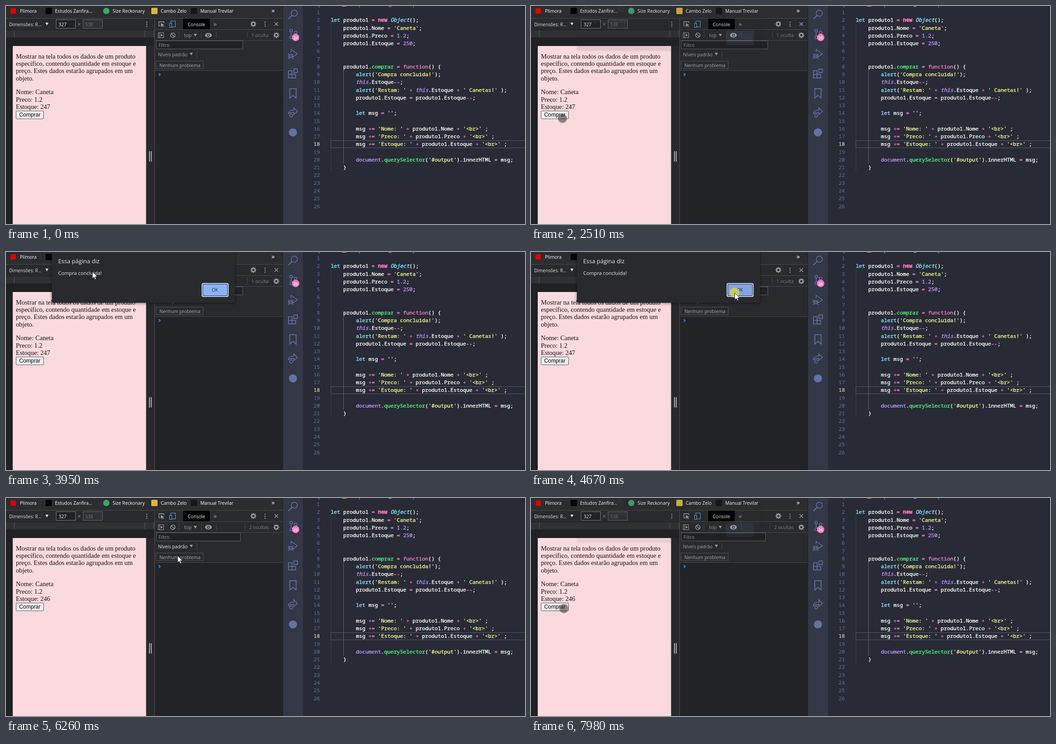
Write an HTML page with a canvas that moves like this. It is 1154 by 485 pixels and loops after 8 s.

```html
<!DOCTYPE html>
<html lang="pt">
<head>
<meta charset="utf-8">
<title>Produto</title>
<style>
html, body { margin: 0; width: 100%; height: 100%; overflow: hidden; background: #222326; }
canvas { display: block; }
</style>
</head>
<body>
<canvas id="stage" width="1154" height="485"></canvas>
<script>
const W = 1154, H = 485, LOOP = 8000;
const screen2d = document.getElementById('stage').getContext('2d');
const layer = document.createElement('canvas');
layer.width = W;
layer.height = H;
const layer2d = layer.getContext('2d');
let g = screen2d;

const UI = '"Open Sans", "Noto Sans", sans-serif';
const SERIF = '"Liberation Serif", serif';
const ARIAL = '"Liberation Sans", sans-serif';
const MONO = '"Noto Sans Mono", "DejaVu Sans Mono", monospace';

function rect(x, y, w, h, color) {
  g.fillStyle = color;
  g.fillRect(x, y, w, h);
}

function frame(x, y, w, h, color, width = 1) {
  g.strokeStyle = color;
  g.lineWidth = width;
  g.strokeRect(x + .5, y + .5, w - 1, h - 1);
}

function round(x, y, w, h, r, color) {
  g.beginPath();
  g.roundRect(x, y, w, h, r);
  g.fillStyle = color;
  g.fill();
}

function disc(x, y, r, color, squash = 1) {
  g.beginPath();
  g.ellipse(x, y, r, r * squash, 0, 0, 7);
  g.fillStyle = color;
  g.fill();
}

function ring(x, y, r, color, width = 1.6) {
  g.beginPath();
  g.arc(x, y, r, 0, 7);
  g.strokeStyle = color;
  g.lineWidth = width;
  g.stroke();
}

// An SVG path drawn with its own origin at x, y
function icon(x, y, d, color, width) {
  const path = new Path2D(d);
  g.save();
  g.translate(x, y);
  if (width) {
    g.strokeStyle = color;
    g.lineWidth = width;
    g.stroke(path);
  } else {
    g.fillStyle = color;
    g.fill(path);
  }
  g.restore();
}

function text(s, x, y, color, size = 10.3, family = UI, align = 'left', style = '') {
  g.font = `${style} ${size}px ${family}`;
  g.textAlign = align;
  g.fillStyle = color;
  g.fillText(s, x, y);
}

function down(x, y, color) {
  icon(x, y, 'M-3.5-3h7L0 3z', color);
}

function kebab(x, y, color) {
  for (const d of [-4.5, 0, 4.5]) disc(x, y + d, 1.2, color);
}

function gear(x, y, color) {
  ring(x, y, 3.7, color, 2.4);
  g.save();
  g.translate(x, y);
  for (let i = 0; i < 8; i++) {
    rect(-1.1, 4, 2.2, 2.3, color);
    g.rotate(Math.PI / 4);
  }
  g.restore();
}

function bookmarks() {
  rect(0, 0, 616, 27, '#2c2d30');
  round(10, 5, 12, 12, 2, '#e00000');
  rect(88, 4, 14, 14, '#050505');
  disc(223, 11, 7, '#3fa66b');
  round(323, 4, 14, 14, 2, '#d9b63c');
  rect(411, 4, 14, 14, '#151515');
  const names = { 31: 'Plimora', 109: 'Estudos Zanfira...', 237: 'Size Reckonary',
    344: 'Cambo Zelo', 432: 'Manual Trevilar' };
  for (const x in names) text(names[x], x, 14.5, '#fff');
  text('»', 594, 15, '#fff', 15, UI, 'center');
  rect(0, 27, 616, 1, '#4a4c50');
}

function deviceBar() {
  rect(0, 28, 330, 25, '#292a2d');
  text('Dimensões: R...', 7, 44.5, '#dfe1e4', 10.1);
  down(91, 40, '#dfe1e4');
  rect(111, 30, 44, 20, '#202124');
  frame(111, 30, 44, 20, '#7d7f82');
  text('327', 117, 44.5, '#fff');
  text('×', 163, 45, '#8c8f93', 12, UI, 'center');
  rect(171, 30, 44, 20, '#303134');
  frame(171, 30, 44, 20, '#66686b');
  text('538', 176, 44.5, '#75777a');
  kebab(313, 40.5, '#9aa0a6');
  rect(0, 53, 330, 17, '#303134');
  rect(0, 53, 330, 1, '#1f2022');
  for (const x of [18, 308, 328]) rect(x, 54, 1, 15, '#55575a');
}

function page(stock) {
  const ink = '#121212';
  rect(0, 70, 330, 415, '#202124');
  rect(312, 89, 18, 396, '#28292c');
  for (const x of [318, 322]) rect(x, 323, 2, 23, '#aeb0b3');
  rect(15, 89, 296.5, 396, '#fadadf');
  const intro = ['Mostrar na tela todos os dados de um produto',
    'específico, contendo quantidade em estoque e',
    'preço. Estes dados estarão agrupados em um', 'objeto.'];
  const data = ['Nome: Caneta', 'Preco: 1.2', 'Estoque: ' + stock];
  intro.forEach((s, i) => text(s, 22, 116.5 + i * 16.4, ink, 14.55, SERIF));
  data.forEach((s, i) => text(s, 22, 196.3 + i * 16.4, ink, 14.55, SERIF));
  round(22, 233, 62, 18.5, 2.5, '#565656');
  round(23, 234, 60, 16.5, 1.5, '#eeeeee');
  text('Comprar', 53, 246.3, '#0a0a0a', 12.2, ARIAL, 'center');
}

function devtools(hidden, hover) {
  const ic = '#9aa0a6', blue = '#62a9f0', rule = '#47494c';
  const shift = hidden > 1 ? 5 : 0;
  rect(331, 28, 285, 457, '#222326');
  rect(331, 28, 285, 115, '#292a2d');
  rect(330, 28, 1, 457, '#505255');
  for (const y of [52, 76, 143]) rect(331, y, 285, 1, rule);

  icon(340, 35, 'M3 9H0V0h11v3', ic, 1.3);
  icon(344, 38, 'M0 0l8 4-3.5 1L7 8 5.5 9 3 6 1 9z', ic);
  frame(366, 33, 11, 14, blue);
  rect(363, 38, 6, 10, '#292a2d');
  frame(363, 38, 6, 10, blue);
  rect(394, 28, 59, 24, '#000');
  text('Console', 423.5, 44.5, '#f1f3f4', 10.4, UI, 'center');
  text('»', 465, 45, ic, 15, UI, 'center');
  gear(550, 40, ic);
  kebab(576, 40.5, ic);
  icon(601, 40, 'M-4-4L4 4M4-4L-4 4', ic, 1.4);

  frame(338, 59, 13, 12, ic);
  icon(341.5, 59, 'M0 0v12', ic, 1);
  icon(344, 62, 'M0 0l5 3-5 3z', ic);
  ring(371, 65, 5, ic, 1.5);
  icon(371, 65, 'M-3.5-3.5l7 7', ic, 1.5);
  text('top', 396, 69, ic, 10.6);
  down(421, 65, ic);
  disc(450, 65, 7.5, ic, .67);
  disc(450, 65, 3.3, '#292a2d');
  disc(450, 65, 1.8, ic);
  for (const x of [384, 434, 467, 536 - shift]) rect(x, 57, 1, 15, rule);
  text(hidden > 1 ? hidden + ' ocultas' : hidden + ' oculta', 584, 69, '#7d8084', 10.4, UI, 'right');
  gear(601, 65, ic);

  rect(334, 77, 193 - shift, 19, '#202124');
  frame(334, 77, 193 - shift, 19, '#5f6164');
  text('Filtro', 339, 90.5, '#96999d', 10.4);
  text('Níveis padrão', 338, 111.5, hover ? '#e8eaed' : ic);
  down(412, 107, ic);
  rect(424, 100, 1, 15, rule);
  frame(333, 122, 106, 18, '#505255');
  text('Nenhum problema', 341, 135.5, '#a9adb2');
  icon(339.5, 149.5, 'M0 0l3.5 3L0 6', '#2f96e8', 1.7);
}

function activityBar() {
  const c = '#6272a4', x = 638, row = i => 19 + i * 43.7;
  rect(615, 0, 1, 485, '#1d1e26');
  rect(616, 0, 44, 485, '#343746');

  ring(x + 3, row(0) - 3, 6.8, c);
  icon(x, row(0), 'M-2 2l-8 8', c, 1.9);

  for (const [dx, dy] of [[-4, -8], [-4, 7], [6, -4]]) ring(x + dx, row(1) + dy, 3, c);
  icon(x, row(1), 'M-4-5v9M6-1Q6 3-3 4', c, 1.6);
  disc(644, 70, 8.2, '#ff79c6');
  text('26', 644, 73.5, '#fff', 8.8, UI, 'center', '600');

  icon(x, row(2), 'M-4-4v-6L10 0 0 7M-11 0l3 3M1 0l-3 3M-12 5H2M-11 11l3-3M1 11l-3-3', c, 1.5);
  ring(x - 5, row(2) + 5, 3.8, c);

  icon(x, row(3), 'M-10-6h8v16h-8zM-10 2H6v8h-8M2-10h8v8H2z', c, 1.7);
  icon(x, row(4), 'M-7-10H7v21L0 5l-7 6z', c, 1.8);
  icon(x, row(5), 'M-10 0Q-8-6 2-6v-5l8 8-8 7v-5Q-6-1-10 2z', c, 1.6);
  ring(x - 4, row(5) + 6, 3.4, c);
  disc(x, row(6), 9, c);
}

const CODE = `
let produto1 = new Object();
    produto1.Nome = 'Caneta';
    produto1.Preco = 1.2;
    produto1.Estoque = 250;


    produto1.comprar = function() {
        alert('Compra concluida!');
        this.Estoque--;
        alert('Restam: ' + this.Estoque + ' Canetas!' );
        produto1.Estoque = produto1.Estoque--;

        let msg = '';

        msg += 'Nome: ' + produto1.Nome + '<br>' ;
        msg += 'Preco: ' + produto1.Preco + '<br>' ;
        msg += 'Estoque: ' + produto1.Estoque + '<br>' ;

        document.querySelector('#output').innerHTML = msg;
    }`.split('\n');

const PLAIN = '#f8f8f2';
const SYNTAX = [
  [/^'/, '#f1fa8c'],
  [/^new$/, '#ff79c6', 'bold'],
  [/^(function|--|\+=|[=+])$/, '#ff79c6'],
  [/^(let|alert)$/, '#8be9fd'],
  [/^Object$/, '#8be9fd', 'italic'],
  [/^this$/, '#bd93f9', 'italic'],
  [/^(document$|\d)/, '#bd93f9'],
  [/^(comprar|querySelector)$/, '#50fa7b'],
  [/./, PLAIN]
];

function codeLine(s, y) {
  for (const { 0: word, index } of s.matchAll(/'[^']*'|\d[\d.]*|\w+|--|\+=|\S/g)) {
    const [, color, style] = SYNTAX.find(([test]) => test.test(word));
    const x = 722 + index * 7;
    text(word, x, y, color, 11.667, MONO, 'left', style);
    g.strokeStyle = color;
    g.lineWidth = .4;
    g.strokeText(word, x, y);
  }
}

function editor() {
  rect(660, 0, 494, 485, '#282a36');
  for (const x of [695, 785, 905]) rect(x, 0, 2, 3, '#626b88');
  rect(747, 0, 10, 1, '#d7c24d');
  rect(851, 0, 6, 2, '#8068a8');
  rect(722, 39, 1, 329, '#3c3e4a');
  rect(750, 143, 1, 208, '#63656f');
  frame(722, 299, 440, 17, '#565970');
  for (let i = 0; i < 26; i++) {
    const y = 18 + i * 17.26;
    text(i + 1, 698, y, i === 17 ? PLAIN : '#6272a4', 11.667, MONO, 'right');
    codeLine(CODE[i] || '', y);
  }
}

function dialog(message, hover, alpha) {
  g = layer2d;
  g.clearRect(0, 0, W, H);
  g.shadowColor = 'rgba(0,0,0,.5)';
  g.shadowBlur = 6;
  g.shadowOffsetY = 1;
  round(102, -30, 407, 143, 4, '#292a2d');
  g.shadowColor = 'transparent';
  text('Essa página diz', 116, 25, '#e8eaed', 13);
  text(message, 116, 51, '#e8eaed', 11.15);
  round(435, 69, 60, 31, 4, '#c3d8fb');
  round(437, 71, 56, 27, 3, '#25282f');
  round(438, 72, 54, 25, 2, hover ? '#84a4e4' : '#8ab4f8');
  text('OK', 464.5, 88, '#202b40', 10, UI, 'center');
  g = screen2d;
  g.globalAlpha = alpha;
  g.drawImage(layer, 0, -15 * (1 - alpha));
  g.globalAlpha = 1;
}

const within = (t, a, b) => t >= a && t < b;
const ramp = (t, a, span) => Math.max(0, Math.min(1, (t - a) / span));

// Each stroke of the mouse curves from the last resting place
const STROKES = [
  { from: 590, to: 1360, via: [720, 352], end: [342, 304] },
  { from: 1360, to: 2190, via: [209, 312], end: [78, 256] },
  { from: 2190, to: 2420, via: [74, 253], end: [70, 250] },
  { from: 3060, to: 3870, via: [195, 253], end: [180, 44] },
  { from: 3930, to: 4620, via: [300, 40], end: [453, 91] },
  { from: 4740, to: 5750, via: [457, 87], end: [459, 83] },
  { from: 5960, to: 7140, via: [417, 126], end: [73, 249] },
  { from: 7140, to: 7330, via: [85, 230], end: [103, 212] },
  { from: 7330, to: 7720, via: [105, 255], end: [61, 248] },
  { from: 7850, to: 7980, via: [67, 248], end: [73, 246] }
];

function pointer(t) {
  let p = [962, 456];
  for (const { from, to, via, end } of STROKES) {
    if (t < from) break;
    const k = 1 - (1 - ramp(t, from, to - from)) ** 1.66;
    p = p.map((v, i) => (1 - k) ** 2 * v + 2 * k * (1 - k) * via[i] + k * k * end[i]);
  }
  return p;
}

const ARROW = 'M0 0v15.5l3.6-3.3 2.6 5.4 2.4-1.1-2.5-5.2 4.9-.1z';

function drawPointer(t, open) {
  const [x, y] = pointer(t);
  const onDialog = open && x > 102 && x < 509 && y < 113;
  if (!onDialog && x > 14 && x < 312 && y > 89) {
    disc(x, y, 9, 'rgba(35,32,32,.5)');
    ring(x, y, 9.6, 'rgba(95,85,87,.5)', 1.8);
  } else if (x < 660) {
    if (within(t, 4590, 4740) || within(t, 5880, 5960)) disc(x - .5, y - .5, 11, 'rgba(214,212,72,.8)');
    icon(x, y, ARROW, '#fff');
    icon(x, y, ARROW, '#111', .9);
  } else if (t >= 590) {
    icon(x, y, 'M-3-8h6M0-8V8M-3 8h6', 'rgba(20,20,28,.6)', 1);
  }
}

const DIALOGS = [
  { message: 'Compra concluida!', opens: 2490, closes: 4725 },
  { message: 'Restam: 246 Canetas!', opens: 4900, closes: 5950 },
  { message: 'Compra concluida!', opens: 7967, closes: LOOP }
];

function draw(t) {
  const done = t >= 6070;
  bookmarks();
  deviceBar();
  page(done ? 246 : 247);
  devtools(done ? 2 : 1, within(t, 6180, 6310));
  activityBar();
  editor();
  let open = false;
  for (const { message, opens, closes } of DIALOGS) {
    const alpha = ramp(t, opens, 210) * (1 - ramp(t, closes, 140));
    if (alpha > 0) {
      dialog(message, within(t, 4490, 6090), alpha);
      open = true;
    }
  }
  drawPointer(t, open);
}

const start = performance.now();
function tick() {
  draw((performance.now() - start) % LOOP);
  requestAnimationFrame(tick);
}
tick();
</script>
</body>
</html>
```
